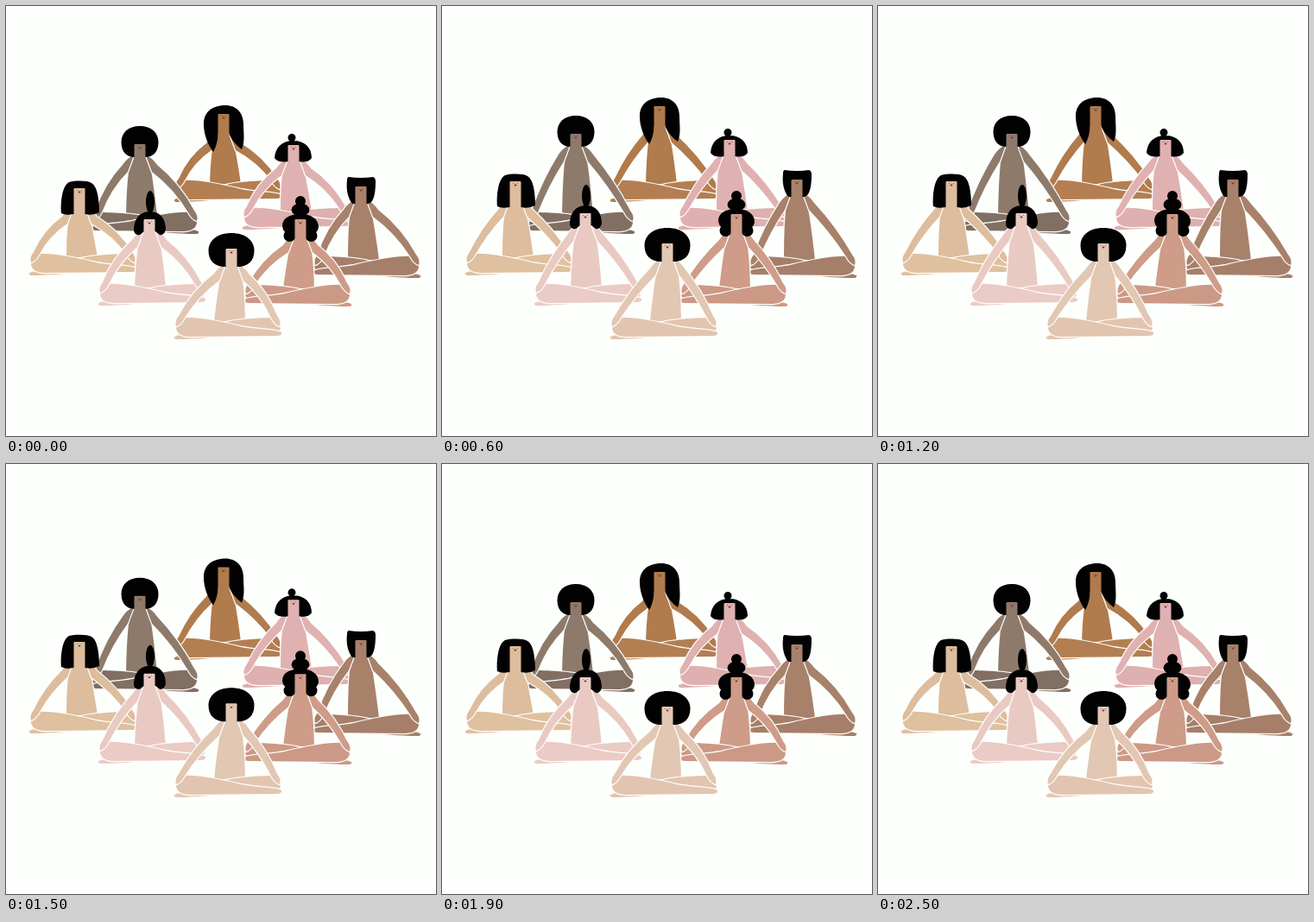
An HTML page that plays this animation: 498x498 px, repeating every 2.6 s.

```html
<!DOCTYPE html>
<html lang="en">
<head>
<meta charset="utf-8">
<title>Breathing circle</title>
<style>
  html, body { margin: 0; width: 100%; height: 100%; overflow: hidden; background: #fdfffc; }
  svg { display: block; width: 498px; height: 498px; }
  .skin { stroke: #fdfffc; stroke-width: 2.4; stroke-linejoin: round; paint-order: stroke; }
</style>
</head>
<body>
<svg id="stage" viewBox="0 0 498 498"></svg>
<script>
const LOOP = 2600, STEP = 100;
const NS = 'http://www.w3.org/2000/svg';
const stage = document.getElementById('stage');

const afro = (w, h) =>
  `M0 0C${w * .62} 0 ${w} ${h * .22} ${w} ${h * .52}C${w} ${h * .84} ${w * .7} ${h} ${w * .3} ${h}` +
  `H${-w * .3}C${-w * .7} ${h} ${-w} ${h * .84} ${-w} ${h * .52}C${-w} ${h * .22} ${-w * .62} 0 0 0Z`;
const oval = (x, y, rx, ry) =>
  `M${x - rx} ${y}a${rx} ${ry} 0 1 1 ${2 * rx} 0a${rx} ${ry} 0 1 1 ${-2 * rx} 0Z`;

// Hair outlines start at the crown (0, 0).
const hair = {
  long: 'M0 0C14 -1 23 8 23 22C23 32 25 42 21 51C15 47 9 40 6 32H-6C-7 42 -9 49 -12 54C-18 46 -23 34 -23 22C-23 8 -14 1 0 0Z',
  round: afro(21.5, 36),
  wide: afro(26.5, 39),
  topBun: oval(-2, 4.5, 4.5, 4.5) + 'M-22 28C-21 15 -13 8 0 8C13 8 21 16 21 28Q17 34 6 32H-6Q-18 34 -22 28Z',
  bob: 'M-12 1C-4 -1 9 -1 14 2C21 6 23 22 23 36Q15 40 7 38H-7Q-16 40 -21 37C-22 24 -20 5 -12 1Z',
  box: 'M-14 0Q0 2 14 0Q17 1 17 5C17 15 16 23 13 28Q10 32 6 31H-6Q-10 32 -12 28C-16 21 -17 12 -16 4Q-16 0 -14 0Z',
  tallBun: oval(1, 13, 5, 13) + 'M-18 46C-18 32 -11 24 1 24C13 24 19 33 19 45Q17 52 12 51L7 47H-6L-11 51Q-17 52 -18 46Z',
  curls: oval(0, 6, 6, 6) + oval(0, 16, 10.5, 7.5) + oval(-12.5, 46, 7, 7) + oval(12.5, 46, 7, 7) +
    'M-21 35C-21 26 -13 21 0 21C13 21 21 27 21 36Q20 44 13 43H-13Q-20 43 -21 35Z'
};

// x: head, hip and leg centres; base: floor; top: crown; face: hairline; sh: shoulder; rise: lift of a breath
const people = [
  { x: 252, hip: 254, leg: 257, base: 227, top: 115, face: 125, sh: 152, rise: 9,  flip: 1,  skin: '#b07b4d', legs: '#b37f52', hair: 'long' },
  { x: 155, hip: 157, leg: 161, base: 264, top: 139, face: 160, sh: 177, rise: 12, flip: -1, skin: '#8e7a6b', legs: '#826f63', hair: 'round' },
  { x: 333, hip: 336, leg: 336, base: 259, top: 148, face: 161, sh: 181, rise: 6,  flip: 1,  skin: '#e0b1b1', legs: '#deb0af', hair: 'topBun' },
  { x: 85,  hip: 88,  leg: 89,  base: 312, top: 203, face: 211, sh: 237, rise: 8,  flip: 1,  skin: '#ddbd9d', legs: '#dfc09f', hair: 'bob' },
  { x: 411, hip: 414, leg: 418, base: 315, top: 198, face: 209, sh: 229, rise: 8,  flip: -1, skin: '#a8816b', legs: '#a67f6a', hair: 'box' },
  { x: 166, hip: 167, leg: 169, base: 347, top: 214, face: 247, sh: 264, rise: 7,  flip: 1,  skin: '#e9cac3', legs: '#ebcbc5', hair: 'tallBun' },
  { x: 341, hip: 339, leg: 338, base: 348, top: 220, face: 247, sh: 270, rise: 6,  flip: -1, skin: '#ce9c88', legs: '#cc9986', hair: 'curls' },
  { x: 261, hip: 259, leg: 257, base: 386, top: 263, face: 281, sh: 303, rise: 6,  flip: 1,  skin: '#e2c7b3', legs: '#e2c5b0', hair: 'wide' }
];

const legParts = [
  'M-62 -3Q-50 -8 -20 -6V-2Q-45 0 -60 0Q-63 -1 -62 -3Z',
  'M-12 -17C5 -24 40 -25 52 -25Q62 -22 61 -14Q60 -5 45 -4L-10 -6Z',
  'M-52 -25C-35 -26 -10 -21 15 -15C35 -11 55 -12 62 -8Q63 -4 56 -4L-45 -3Q-60 -4 -60 -14Q-60 -24 -52 -25Z'
];

function add(parent, tag, attrs = {}) {
  const el = document.createElementNS(NS, tag);
  for (const key in attrs) el.setAttribute(key, attrs[key]);
  return parent.appendChild(el);
}

function torso(p, sh) {
  const y = p.base - 21;
  return `M${p.x - 6.5} ${sh - 8}Q${p.x - 7} ${sh - 2} ${p.x - 11} ${sh + 4}Q${p.x - 15} ${sh + 20} ${p.hip - 18} ${y}` +
    `H${p.hip + 18}Q${p.x + 15} ${sh + 20} ${p.x + 11} ${sh + 4}Q${p.x + 7} ${sh - 2} ${p.x + 6.5} ${sh - 8}Z`;
}

// The elbow bends outwards a little, less so when the shoulders are up.
function arm(p, sh, side, bend) {
  const h = d => p.x + side * d, k = d => p.leg + side * d, b = p.base;
  const elbow = (h(20) + k(57)) / 2 + side * bend, y = (sh + b - 20) / 2 - bend;
  return `M${h(7)} ${sh - 4}Q${h(15)} ${sh - 1} ${h(20)} ${sh + 7}Q${elbow} ${y} ${k(57)} ${b - 27}` +
    `Q${k(62)} ${b - 21} ${k(60)} ${b - 15}Q${k(54)} ${b - 17} ${k(50)} ${b - 25}` +
    `Q${elbow - side * 7} ${y + 6} ${h(14)} ${sh + 15}Z`;
}

function build(p) {
  const g = add(stage, 'g');
  const skin = { class: 'skin', fill: p.skin };
  p.torso = add(g, 'path', skin);
  const legs = add(g, 'g', { transform: `translate(${p.leg} ${p.base}) scale(${p.flip} 1)` });
  for (const d of legParts) add(legs, 'path', { d, class: 'skin', fill: p.legs });
  p.arms = [-1, 1].map(side => ({ side, el: add(g, 'path', skin) }));
  p.head = add(g, 'g');
  add(p.head, 'path', { d: hair[p.hair], fill: '#020202', transform: `translate(${p.x} ${p.top})` });
  add(p.head, 'rect', { x: p.x - 6.5, y: p.face, width: 13, height: p.sh + 5 - p.face, rx: 1, fill: p.skin });
  for (const dx of [-2.3, 2.3])
    add(p.head, 'circle', { cx: p.x + dx, cy: p.face + 2.5, r: .45, fill: '#49372f' });
  add(p.head, 'ellipse', { cx: p.x, cy: p.face + 4.5, rx: 1.4, ry: .9, fill: '#7a3832' });
}

// Quick inhale, hold, slow exhale, rest.
function breath(t) {
  if (t < 250) return Math.sin(t / 250 * Math.PI / 2);
  if (t < 1200) return 1;
  if (t < 1900) return (1 + Math.cos((t - 1200) / 700 * Math.PI)) / 2;
  return 0;
}

function draw(now) {
  const t = Math.floor(now % LOOP / STEP) * STEP;
  const air = breath(t);
  for (const p of people) {
    const lift = p.rise * air, sh = p.sh - lift;
    p.torso.setAttribute('d', torso(p, sh));
    for (const a of p.arms) a.el.setAttribute('d', arm(p, sh, a.side, 5 - 2 * air));
    p.head.setAttribute('transform', `translate(0 ${-lift})`);
  }
}

people.forEach(build);
const start = performance.now();
function tick() {
  draw(performance.now() - start);
  requestAnimationFrame(tick);
}
tick();
</script>
</body>
</html>
```
